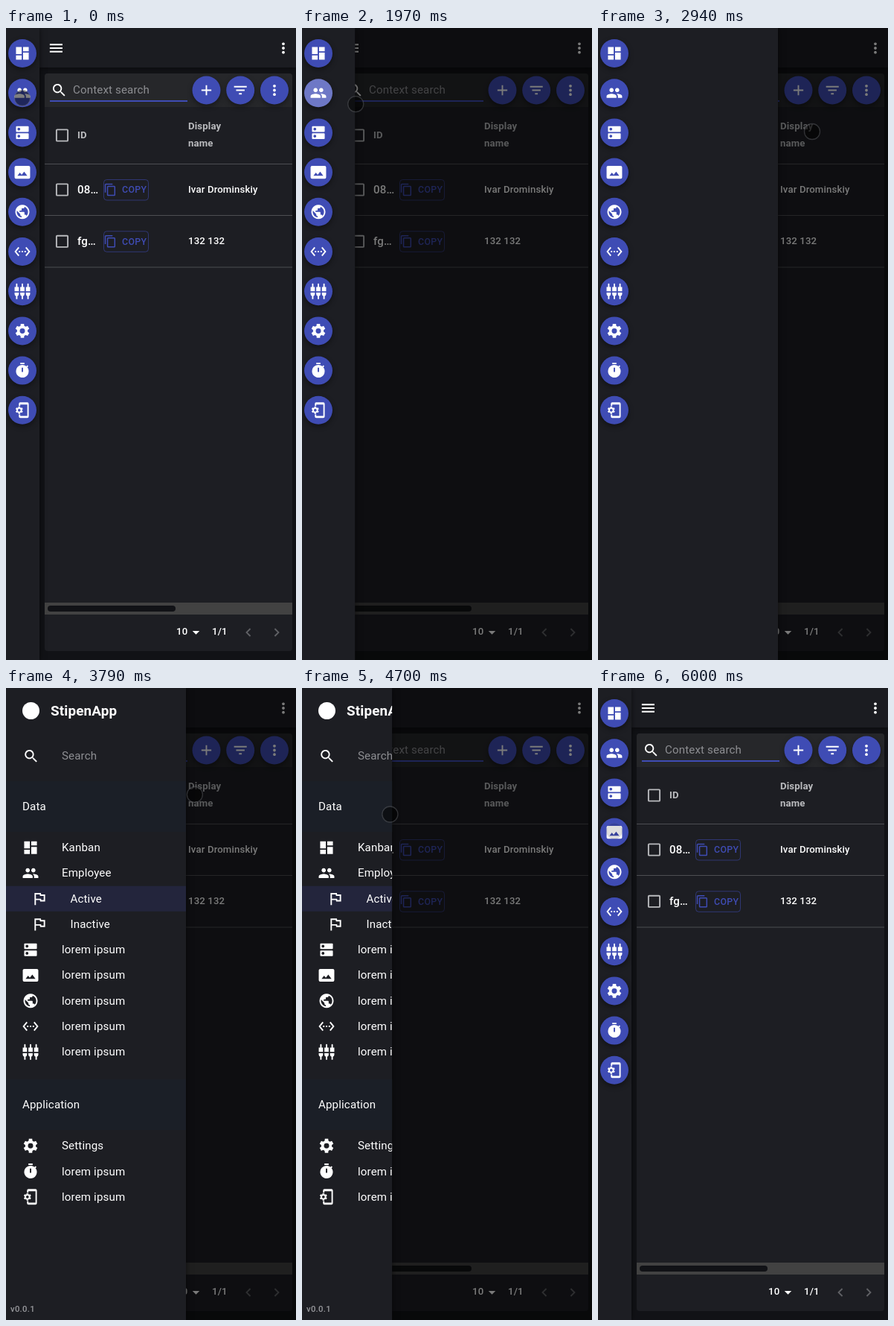
An HTML page with a canvas for the animation above (6.03 s loop, 390 by 848 pixels).

```html
<!DOCTYPE html>
<html lang="en">
<head>
<meta charset="utf-8">
<title>Swipeable drawer</title>
<style>
html, body { margin: 0; width: 100%; height: 100%; overflow: hidden; background: #111216; }
canvas { display: block; width: 390px; height: 848px; }
</style>
</head>
<body>
<canvas id="stage"></canvas>
<script>
const W = 390, H = 848, LOOP = 6030;
const canvas = document.getElementById('stage');
const ctx = canvas.getContext('2d');
const dpr = window.devicePixelRatio || 1;
canvas.width = W * dpr;
canvas.height = H * dpr;

const color = {
  page: '#111216', paper: '#1d1e23', toolbar: '#26272a', primary: '#3f4cb4',
  line: '#4d4e52', white: '#fff', muted: '#8d8e92', head: '#b9babd', off: '#606165'
};

// Icons live on a 24 x 24 grid.
function gear(cx, cy, r) {
  const path = new Path2D();
  for (let k = 0; k < 6; k++) {
    const a = k * Math.PI / 3 - Math.PI / 2;
    for (const [da, f] of [[-.36, .74], [-.23, 1], [.23, 1], [.36, .74]]) {
      path.lineTo(cx + Math.cos(a + da) * r * f, cy + Math.sin(a + da) * r * f);
    }
  }
  path.closePath();
  path.moveTo(cx + r * .36, cy);
  path.arc(cx, cy, r * .36, 0, Math.PI * 2);
  return path;
}
const P = d => new Path2D(d);
const icons = {
  dashboard: P('M3 13h8V3H3zM3 21h8v-6H3zM13 21h8V11h-8zM13 3v6h8V3z'),
  people: P('M16 5a3 3 0 1 0 .01 0zM8 5a3 3 0 1 0 .01 0zM8 13c-2.33 0-7 1.17-7 3.5V19h14v-2.5c0-2.33-4.67-3.5-7-3.5zM16 13l-.97.05c1.16.84 1.97 1.97 1.97 3.45V19h6v-2.5c0-2.33-4.67-3.5-7-3.5z'),
  storage: new Path2D(),
  image: P('M21 3H3a2 2 0 0 0-2 2v14a2 2 0 0 0 2 2h18a2 2 0 0 0 2-2V5a2 2 0 0 0-2-2zM5 17l3.5-4.5 2.5 3 3.5-4.5 4.5 6z'),
  globe: P('M12 2a10 10 0 1 0 .01 0zM11 19.93A8 8 0 0 1 4.21 10.21L9 15v1a2 2 0 0 0 2 2zM17.9 17.39A2 2 0 0 0 16 16h-1v-3a1 1 0 0 0-1-1H8v-2h2a1 1 0 0 0 1-1V7h2a2 2 0 0 0 2-2v-.41a8 8 0 0 1 2.9 12.8z'),
  code: P('M7.77 6.76L6.23 5.48.82 12l5.41 6.52 1.54-1.28L3.42 12zM7 11h2v2H7zM11 11h2v2h-2zM15 11h2v2h-2zM17.77 5.48l-1.54 1.28L20.58 12l-4.35 5.24 1.54 1.28L23.18 12z'),
  inputs: new Path2D(),
  settings: gear(12, 12, 10.2),
  timer: P('M9 1h6v2H9zM11 8v6h2V8zM19.03 7.39l1.42-1.42-1.41-1.41-1.42 1.42A9 9 0 1 0 19.03 7.39z'),
  device: P('M19 1H9a2 2 0 0 0-2 2v3h2V4h10v16H9v-2H7v3a2 2 0 0 0 2 2h10a2 2 0 0 0 2-2V3a2 2 0 0 0-2-2z'),
  flag: P('M12.36 6l.4 2H18v6h-3.36l-.4-2H7V6zM14 4H5v17h2v-7h5.6l.4 2h7V6h-5.6z'),
  search: P('M15.5 14h-.79l-.28-.27A6.5 6.5 0 1 0 13.73 14.43l.27.28v.79l5 4.99L20.49 19zM9.5 5a4.5 4.5 0 1 0 .01 0z'),
  copy: P('M16 1H4a2 2 0 0 0-2 2v14h2V3h12zM19 5H8a2 2 0 0 0-2 2v14a2 2 0 0 0 2 2h11a2 2 0 0 0 2-2V7a2 2 0 0 0-2-2zM19 21H8V7h11z'),
  add: P('M19 13h-6v6h-2v-6H5v-2h6V5h2v6h6z'),
  filter: P('M10 16h4v2h-4zM3 6h18v2H3zM6 11h12v2H6z'),
  more: P('M12 4a2 2 0 1 0 .01 0zM12 10a2 2 0 1 0 .01 0zM12 16a2 2 0 1 0 .01 0z'),
  menu: P('M3 6h18v2H3zM3 11h18v2H3zM3 16h18v2H3z'),
  check: P('M5 3h14a2 2 0 0 1 2 2v14a2 2 0 0 1-2 2H5a2 2 0 0 1-2-2V5a2 2 0 0 1 2-2zM5 5v14h14V5z'),
  down: P('M7 10l5 5 5-5z'),
  prev: P('M15.41 7.41L14 6l-6 6 6 6 1.41-1.41L10.83 12z'),
  next: P('M10 6L8.59 7.41 13.17 12l-4.58 4.59L10 18l6-6z')
};
for (const y of [3, 13]) {
  icons.storage.roundRect(3, y, 18, 8, 1);
  icons.storage.addPath(P(`M7 ${y + 2}a2 2 0 1 0 .01 0z`));
}
for (const x of [1, 9, 17]) {
  icons.inputs.addPath(P(`M${x} 6h2V2a1 1 0 0 1 2 0v4h2v6h-6zM${x} 14h6v2a3 3 0 0 1-2 2.82V23h-2v-4.18a3 3 0 0 1-2-2.82z`));
}
icons.device.addPath(gear(7.6, 12, 5.4));

const railIcons = ['dashboard', 'people', 'storage', 'image', 'globe', 'code', 'inputs', 'settings', 'timer', 'device'];
const dataItems = [
  ['dashboard', 'Kanban'], ['people', 'Employee'], ['flag', 'Active', true], ['flag', 'Inactive', true],
  ...['storage', 'image', 'globe', 'code', 'inputs'].map(name => [name, 'lorem ipsum'])
];
const appItems = [['settings', 'Settings'], ['timer', 'lorem ipsum'], ['device', 'lorem ipsum']];

// time, finger x, finger y, drawer edge
const drag = [
  [0, 22, 94, 22], [1760, 22, 94, 22], [1970, 72, 102, 71], [2420, 187, 122, 185],
  [2880, 288, 139, 286], [3610, 288, 139, 286], [3790, 254, 143, 259],
  [4450, 175, 159, 180], [5000, 51, 182, 51], [5200, 22, 191, 22], [LOOP, 22, 192, 22]
];
const OPENED = 3030, CLOSED = 5520;

const clamp = (v, lo, hi) => Math.min(hi, Math.max(lo, v));
const ramp = (t, from, to) => clamp((t - from) / (to - from), 0, 1);

function pose(t) {
  const i = drag.findIndex(k => k[0] > t);
  const a = drag[i - 1], b = drag[i], u = ramp(t, a[0], b[0]);
  const [, x, y, edge] = a.map((v, n) => v + (b[n] - v) * u);
  return { x, y, edge: clamp(edge, 45, 242) };
}

function rect(x, y, w, h, fill) {
  ctx.fillStyle = fill;
  ctx.fillRect(x, y, w, h);
}
function disc(x, y, r, fill) {
  ctx.fillStyle = fill;
  ctx.beginPath();
  ctx.arc(x, y, r, 0, Math.PI * 2);
  ctx.fill();
}
function icon(name, x, y, fill = color.white, size = 22.8) {
  ctx.save();
  ctx.translate(x - size / 2, y - size / 2);
  ctx.scale(size / 24, size / 24);
  ctx.fillStyle = fill;
  ctx.fill(icons[name], 'evenodd');
  ctx.restore();
}
function text(str, x, y, size = 15.1, fill = color.white, weight = 400, spacing = .14) {
  ctx.font = `${weight} ${size}px Roboto, sans-serif`;
  ctx.letterSpacing = spacing + 'px';
  ctx.fillStyle = fill;
  ctx.fillText(str, x, y);
}
function shadow(blur, dy, alpha) {
  ctx.shadowColor = `rgba(0,0,0,${alpha})`;
  ctx.shadowBlur = blur * dpr;
  ctx.shadowOffsetY = dy * dpr;
}
function fab(name, x, y, fill = color.primary) {
  ctx.save();
  shadow(7, 3, .4);
  disc(x, y, 19, fill);
  ctx.restore();
  icon(name, x, y);
}

function drawRow(y, id, name) {
  icon('check', 75.5, y, '#b9babd');
  text(id, 96, y + 5, 15.1, color.white, 500);
  ctx.strokeStyle = 'rgba(63,76,180,.55)';
  ctx.lineWidth = 1;
  ctx.beginPath();
  ctx.roundRect(131.5, y - 13.5, 60, 27.5, 4);
  ctx.stroke();
  icon('copy', 140.3, y, color.primary, 18);
  text('COPY', 156, y + 4.3, 12.3, color.primary, 500, .4);
  text(name, 245, y + 4, 13.2, color.white, 500);
}

function drawPage() {
  rect(0, 0, W, H, color.page);
  ctx.save();
  shadow(6, 2, .35);
  rect(45, 0, W - 45, 53, '#1b1c21');
  ctx.restore();
  icon('menu', 67.4, 27);
  icon('more', 373, 27);

  ctx.save();
  ctx.beginPath();
  ctx.roundRect(52, 61, 333, 775, 4);
  ctx.clip();
  rect(52, 61, 333, 775, color.paper);
  rect(52, 61, 333, 45, color.toolbar);
  rect(52, 771, 333, 16, '#424242');
  ctx.restore();

  icon('search', 71.5, 83.5);
  text('Context search', 90, 88, 15.1, color.muted);
  rect(59, 97, 185, 2, color.primary);
  fab('add', 269.5, 83.5);
  fab('filter', 315.2, 83.5);
  fab('more', 361, 83.5);

  icon('check', 75.5, 144, '#b9babd');
  text('ID', 96, 148, 13.2, color.head, 700);
  text('Display', 245, 136, 13.2, color.head, 700);
  text('name', 245, 159, 13.2, color.head, 700);
  for (const y of [182, 251, 320.5]) rect(52, y, 333, 1, color.line);
  drawRow(217, '08…', 'Ivar Drominskiy');
  drawRow(286.3, 'fg…', '132 132');

  ctx.fillStyle = color.page;
  ctx.beginPath();
  ctx.roundRect(56, 775, 172, 8, 4);
  ctx.fill();
  text('10', 229, 814.3, 13.2, color.white, 500);
  icon('down', 255.5, 811);
  text('1/1', 277, 814.3, 13.2, color.white, 500);
  icon('prev', 326, 811, color.off);
  icon('next', 364, 811, color.off);
}

function drawRail(press) {
  const mix = (a, b) => Math.round(a + (b - a) * press);
  const pressed = `rgb(${mix(63, 110)},${mix(76, 120)},${mix(180, 198)})`;
  railIcons.forEach((name, i) => fab(name, 22, 34 + i * 53.2, name === 'people' ? pressed : color.primary));
}

function drawItems(items, top) {
  items.forEach(([name, label, nested], i) => {
    const y = top + i * 34.25;
    if (label === 'Active') rect(0, y - 17, 242, 34, '#23253c');
    icon(name, nested ? 45 : 33, y);
    text(label, nested ? 86.5 : 75, y + 5);
  });
}

function drawMenu() {
  disc(33.5, 30.5, 11.5, color.white);
  text('StipenApp', 60, 37, 18.9, color.white, 700);
  icon('search', 33.8, 91.5);
  text('Search', 75, 96, 15.1, color.muted);
  for (const [label, y] of [['Data', 159], ['Application', 559]]) {
    rect(0, y - 34, 242, 68, '#1b1f27');
    text(label, 22, y + 5);
  }
  drawItems(dataItems, 214.2);
  drawItems(appItems, 614.3);
  text('v0.0.1', 6, 837, 11.3, '#98999d', 500, .3);
}

function drawDrawer(t, edge) {
  ctx.save();
  shadow(8, 0, .55);
  rect(0, 0, edge, H, color.paper);
  ctx.restore();
  ctx.save();
  ctx.beginPath();
  ctx.rect(0, 0, edge, H);
  ctx.clip();
  if (t >= OPENED && t < CLOSED) {
    ctx.globalAlpha = ramp(t, OPENED - 60, OPENED + 160);
    drawMenu();
  } else {
    drawRail(ramp(t, 640, 1090) * (1 - ramp(t, 2020, 2320)));
  }
  ctx.restore();
}

function drawFinger(t, { x, y }) {
  const lifted = ramp(t, 2990, 3200) - ramp(t, 3550, 3640);
  const alpha = (1 - lifted) * (1 - .75 * ramp(t, 5520, 5950));
  if (alpha <= 0) return;
  ctx.save();
  ctx.globalAlpha = alpha;
  disc(x, y, 10.5, 'rgba(0,0,0,.5)');
  ctx.strokeStyle = 'rgba(110,112,118,.4)';
  ctx.lineWidth = 1.3;
  ctx.stroke();
  ctx.restore();
}

function render(t) {
  ctx.setTransform(dpr, 0, 0, dpr, 0, 0);
  const now = pose(t);
  drawPage();
  const dim = .52 * ramp(t, 1760, 1950) * (1 - ramp(t, CLOSED, CLOSED + 220));
  if (dim) rect(0, 0, W, H, `rgba(0,0,0,${dim})`);
  drawDrawer(t, now.edge);
  drawFinger(t, now);
}

const start = performance.now();
function frame() {
  render((performance.now() - start) % LOOP);
  requestAnimationFrame(frame);
}
frame();
</script>
</body>
</html>
```
